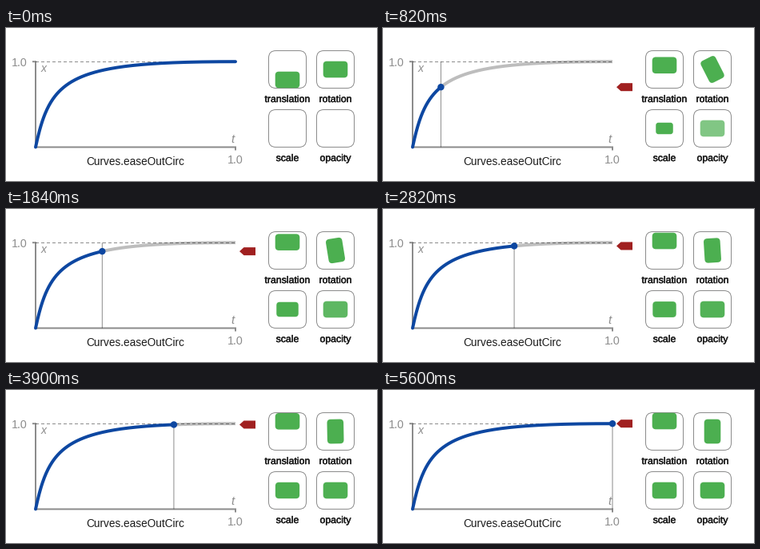
A matplotlib script that plays this animation: 464 px wide and 192 px high, repeating every 5.62 s.

```python
import numpy as np
import matplotlib.pyplot as plt
from matplotlib.animation import FuncAnimation
from matplotlib.patches import Circle, FancyBboxPatch, Polygon
from matplotlib.patheffects import withStroke
from matplotlib.transforms import Affine2D

W, H, DPI = 464, 192, 64
PX = 72 / DPI
LEFT, RIGHT, TOP, BOTTOM = 37, 287, 42.2, 149.5
BLUE, GREEN, RED = "#0D47A1", "#4CAF50", "#A02020"
GREY45, GREY26 = (0, 0, 0, 0.45), (0, 0, 0, 0.26)
INK = "#1a1a1a"
STEPS = 120
TICK = 20
TICKS = 281

plt.rcParams["font.family"] = "Liberation Sans"
fig = plt.figure(figsize=(W / DPI, H / DPI), dpi=DPI, facecolor="white")
ax = fig.add_axes([0, 0, 1, 1])
ax.set(xlim=(0, W), ylim=(H, 0))
ax.axis("off")


def bezier(s, p1, p2):
    return 3 * (1 - s) ** 2 * s * p1 + 3 * (1 - s) * s ** 2 * p2 + s ** 3


S = np.linspace(0, 1, 2001)
CURVE_T, CURVE_V = bezier(S, 0.075, 0.165), bezier(S, 0.82, 1.0)


def ease_out_circ(t):
    return np.interp(t, CURVE_T, CURVE_V)


def to_px(t):
    return LEFT + (RIGHT - LEFT) * t, BOTTOM - (BOTTOM - TOP) * ease_out_circ(t)


def line(xs, ys, width, color, z, **kw):
    return ax.plot(xs, ys, lw=width * PX, color=color, zorder=z, snap=False, **kw)[0]


def label(x, y, s, size, color=GREY45, **kw):
    ax.text(x, y, s, fontsize=size * PX, color=color, va="baseline", **kw)


def rounded(x, y, w, h, r, **kw):
    style = f"round,pad=0,rounding_size={r}"
    return ax.add_patch(FancyBboxPatch((x, y), w, h, boxstyle=style, **kw))


def green_tile(w=30.6, h=20.6):
    return rounded(-w / 2, -h / 2, w, h, 4.5, fc=GREEN, ec="none", zorder=3)


def place(tile, cx, cy, angle=0, scale=1):
    move = Affine2D().scale(scale).rotate_deg(angle).translate(cx, cy)
    tile.set_transform(move + ax.transData)


# Graph frame
line([LEFT - 4, LEFT, LEFT, RIGHT, RIGHT], [TOP, TOP, BOTTOM, BOTTOM, BOTTOM + 4],
     2, GREY45, 1, solid_capstyle="butt", solid_joinstyle="miter")
line([LEFT, RIGHT], [42.5, 42.5], 1, GREY45, 1, dashes=(4, 3), dash_capstyle="butt")
label(27, 48, "1.0", 14.3, ha="right")
label(RIGHT, 170, "1.0", 14.3, ha="center")
label(43.5, 55, "x", 14, style="italic")
label(281.5, 143.5, "t", 15, style="italic")
label((LEFT + RIGHT) / 2, 172, "Curves.easeOutCirc", 13.6, INK, ha="center")

# Demo boxes, captioned in a medium weight
medium = [withStroke(linewidth=0.45 * PX, foreground=INK)]
for bx, by, name in [(328, 28, "translation"), (388, 28, "rotation"),
                     (328, 102, "scale"), (388, 102, "opacity")]:
    rounded(bx + 0.5, by + 0.5, 47, 47, 9, fc="none", ec=GREY45, lw=PX, zorder=2)
    label(bx + 24, by + 65, name, 12.3, INK, ha="center", path_effects=medium)

rest = line([], [], 4, GREY26, 3, solid_capstyle="butt")
done = line([], [], 4, BLUE, 4, solid_capstyle="round", solid_joinstyle="round")
guide = line([], [], 1, GREY45, 5, solid_capstyle="butt")
dot = ax.add_patch(Circle((0, 0), 4.2, fc=BLUE, ec="none", zorder=6))
marker = ax.add_patch(Polygon([(0, 0)] * 5, fc=RED, ec="none", zorder=6, snap=False))
slide, spin, grow, fade = (green_tile() for _ in range(4))
place(fade, 412, 126)


def step_at(tick):
    """Three steps per 140 ms, held for 20, 100 and 20 ms."""
    cycle, part = divmod(tick, 7)
    return 3 * cycle + (part > 0) + (part > 5)


def update(tick):
    t = step_at(tick) / STEPS
    v = float(ease_out_circ(t))
    moving = t > 0
    for art in (rest, guide, dot, marker, grow, fade):
        art.set_visible(moving)

    done.set_data(*to_px(np.linspace(0, t if moving else 1, 300)))
    rest.set_data(*to_px(np.linspace(t, 1, 300)))
    x, y = to_px(t)
    guide.set_data([x, x], [TOP, BOTTOM])
    dot.center = x, y
    marker.set_xy([(292, y), (297.5, y - 5), (312, y - 5),
                   (312, y + 5), (297.5, y + 5)])

    place(slide, 352, 65 - 26 * v)
    place(spin, 412, 52, angle=90 * v)
    place(grow, 352, 126, scale=max(v, 0.001))
    fade.set_alpha(min(v, 1))
    return rest, done, guide, dot, marker, slide, spin, grow, fade


anim = FuncAnimation(fig, update, frames=TICKS, interval=TICK, repeat=True,
                     repeat_delay=0)
plt.show()
```
